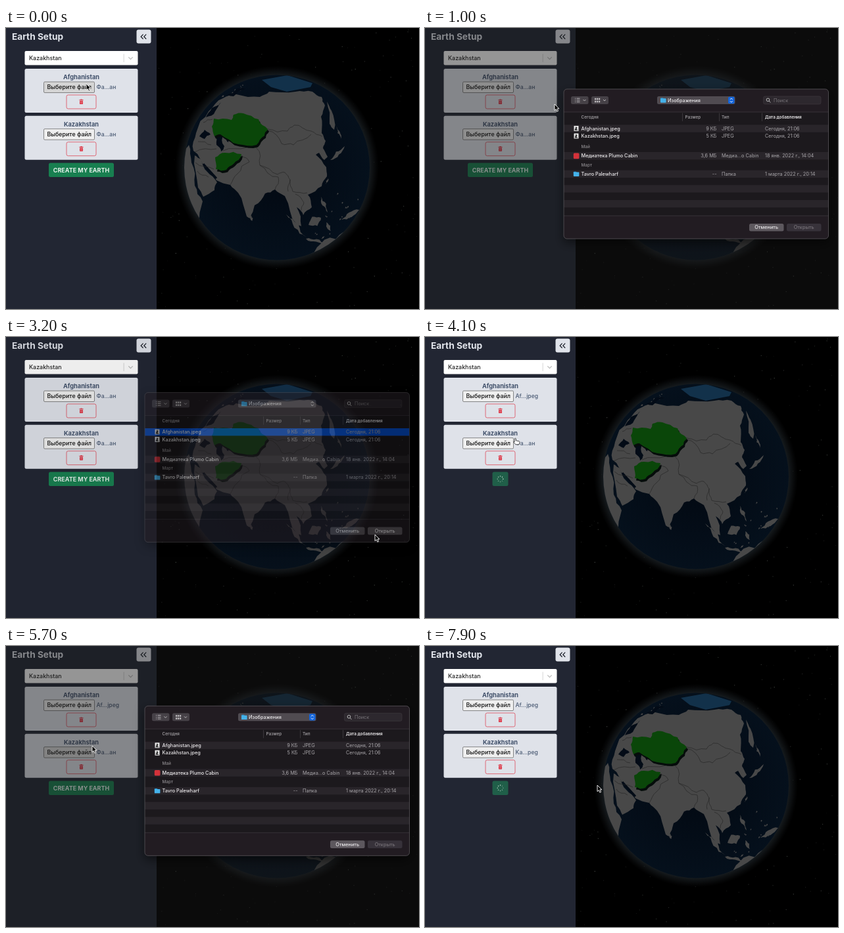
Recreate the animation shown at these times as an HTML page. Size 628x428 px, loop 8000 ms.

```html
<!DOCTYPE html>
<html lang="ru">
<head>
<meta charset="utf-8">
<title>Earth Setup</title>
<style>
html, body { margin: 0; width: 100%; height: 100%; overflow: hidden; background: #000; }
svg { display: block; width: 628px; height: 428px; }
text { font-family: Inter, "Noto Sans", sans-serif; white-space: pre; }
</style>
</head>
<body>
<svg id="stage" viewBox="0 0 628 428" xmlns="http://www.w3.org/2000/svg"></svg>
<script>
const LOOP = 8000, STEP = 100;
const stage = document.getElementById('stage');

const text = (x, y, s, size, fill, weight = 400, anchor = 'start', more = '') =>
  `<text x="${x}" y="${y}" font-size="${size}" fill="${fill}" font-weight="${weight}" text-anchor="${anchor}" ${more}>${s}</text>`;
const rect = (x, y, w, h, fill, r = 0, more = '') =>
  `<rect x="${x}" y="${y}" width="${w}" height="${h}" rx="${r}" fill="${fill}" ${more}/>`;
const dot = (x, y, r, fill, opacity = 1) =>
  `<circle cx="${x.toFixed(1)}" cy="${y.toFixed(1)}" r="${r.toFixed(2)}" fill="${fill}" opacity="${opacity.toFixed(2)}"/>`;
const shape = (d, fill, more = '') => `<path d="M${d}Z" fill="${fill}" ${more}/>`;
const line = (d, stroke, w = 1) => `<path d="${d}" fill="none" stroke="${stroke}" stroke-width="${w}"/>`;
const times = (n, f) => Array.from({ length: n }, (_, i) => f(i)).join('');

let seed = 77;
const rnd = () => (seed = (seed * 16807) % 2147483647) / 2147483647;

// Turns a few key points into a jagged outline by midpoint displacement.
function rough(points, bend = 0.1, closed = true) {
  let p = points.split(' ').map(s => s.split(',').map(Number));
  for (let pass = 0; pass < 2; pass++) {
    p = p.flatMap((a, i) => {
      if (!closed && i === p.length - 1) return [a];
      const b = p[(i + 1) % p.length], k = (rnd() * 2 - 1) * bend;
      return [a, [(a[0] + b[0]) / 2 - (b[1] - a[1]) * k, (a[1] + b[1]) / 2 + (b[0] - a[0]) * k]];
    });
  }
  return p.map(q => q.map(v => v.toFixed(1)).join()).join(' ');
}

// A long island from one end to the other.
function island(x1, y1, x2, y2, w) {
  const len = Math.hypot(x2 - x1, y2 - y1), mx = (x1 + x2) / 2, my = (y1 + y2) / 2;
  const nx = (y2 - y1) / len * w, ny = (x1 - x2) / len * w;
  return rough(`${x1},${y1} ${mx + nx},${my + ny} ${x2},${y2} ${mx - nx},${my - ny}`, 0.18);
}

function globe() {
  const land = '#484848', sea = '#030b16';
  const mainland = '285,187 289,160 308,127 330,107 350,101 386,105 400,97 440,97 466,97 480,105 485,118 479,135 480,160 486,172 482,183 489,196 484,201 476,190 471,193 487,212 488,226 480,241 459,254 465,273 452,285 442,273 449,302 443,300 424,256 409,246 394,252 378,270 372,290 366,287 353,251 341,239 320,232 304,212';
  const coasts = [
    mainland,
    '272,185 278,178 282,205 287,240 299,264 290,298 278,278 268,225',
    '287,194 297,201 306,219 321,235 317,247 300,257 292,243',
    '488,112 495,126 499,155 492,146'
  ].map(p => rough(p));
  const isles = [
    [426, 284, 457, 319, 4], [460, 300, 479, 289, 8], [456, 321, 488, 326, 2], [479, 257, 489, 281, 3],
    [493, 201, 515, 180, 3], [502, 150, 510, 169, 2], [487, 296, 494, 309, 3], [510, 292, 537, 277, 4],
    [461, 345, 514, 310, 6], [373, 286, 374, 294, 2], [486, 238, 490, 229, 1.5]
  ].map(a => island(...a));
  const waters = [
    '317,162 328,161 332,180 327,188 320,178', '294,165 302,155 311,162 302,169',
    '304,136 313,122 327,113 318,127', '334,168 340,168 338,174', '336,102 352,92 364,93 346,104'
  ].map(p => rough(p, 0.15));
  const borders = [
    '398,154 428,157 438,148 464,157 481,165', '398,156 419,176 437,178 464,162',
    '380,182 386,209 413,223 424,220 432,231 429,249', '358,194 370,204 352,222 341,239',
    '386,209 398,221 414,227 409,246', '432,231 436,249 458,251', '440,253 453,266 449,278',
    '292,173 312,178', '287,189 320,184', '291,218 308,227', '288,205 316,215', '300,144 314,139', '330,187 366,182'
  ].map(p => rough(p, 0.15, false));
  const specks = times(34, i => {
    const a = i < 16 ? -2.4 + rnd() * 1.1 : 0.35 + rnd() * 0.7, r = i < 16 ? 126 + rnd() * 13 : 98 + rnd() * 38;
    const x = 412 + r * Math.cos(a), y = 212 + r * Math.sin(a), s = 1 + rnd() * 4;
    return shape(island(x, y, x - s * Math.sin(a), y + s * Math.cos(a), 1), land);
  });
  const raised = p => {
    const d = rough(p, 0.12);
    return shape(d, '#050c0a', 'transform="translate(2 3.5)"') + shape(d, '#0a4609');
  };
  return `
    <defs>
      <clipPath id="ball"><circle cx="412" cy="212.5" r="141"/></clipPath>
      <radialGradient id="sea"><stop offset="0" stop-color="#020811"/><stop offset="1" stop-color="#05101c"/></radialGradient>
      <radialGradient id="halo"><stop offset=".9" stop-color="#20282d" stop-opacity=".75"/><stop offset=".95" stop-color="#161a1d" stop-opacity=".5"/><stop offset="1" stop-color="#101214" stop-opacity="0"/></radialGradient>
    </defs>
    <circle cx="412" cy="212.5" r="155" fill="url(#halo)"/>
    <circle cx="412" cy="212.5" r="141" fill="url(#sea)"/>
    <g clip-path="url(#ball)" stroke-linejoin="round">
      ${specks}
      ${[...coasts, ...isles].map(d => shape(d, land)).join('')}
      ${line('M300,207 320,229', sea, 3)}
      ${waters.map(d => shape(d, sea)).join('')}
      ${borders.map(d => line('M' + d, '#222', 0.6)).join('')}
      ${shape('389,79 428,72 466,84 463,90 427,97 403,90', '#12314a')}
      ${raised('313,150 316,138 343,140 346,132 361,130 384,139 398,154 393,164 381,178 353,177 326,162 317,165')}
      ${raised('318,197 333,190 358,192 346,207 335,216 319,215')}
    </g>`;
}

function card(y, name, id) {
  return rect(28.5, y, 172, 67, '#dfe2e9', 2.5) +
    text(114.5, y + 16, name, 9.2, '#40506a', 700, 'middle') +
    rect(57.5, y + 20, 77, 16.5, '#efefef', 1.5, `id="pick${id}" stroke="#6b6b6b" stroke-width=".8"`) +
    text(96.2, y + 31.3, 'Выберите файл', 8.9, '#111', 500, 'middle') +
    text(137.5, y + 31.3, '', 8.6, '#4b5b74', 500, 'start', `id="file${id}"`) +
    rect(92, y + 40, 45, 21, 'none', 2.5, 'stroke="#dc4a58" stroke-width=".8"') +
    rect(111.4, y + 47.2, 6.2, 1, '#dc3545') + rect(113.2, y + 46.5, 2.6, 1, '#dc3545') +
    rect(112, y + 48.7, 5, 5.4, '#dc3545', 0.7) +
    line(`M113.6,${y + 49.7}v3.4M115.4,${y + 49.7}v3.4`, '#efb9c0', 0.5);
}

function panel() {
  const ring = times(8, i => {
    const a = i * Math.PI / 4;
    return dot(114.5 + 4.2 * Math.cos(a), 216.3 + 4.2 * Math.sin(a), 0.75, '#e3efe8', 0.35 + i * 0.085);
  });
  return rect(0, 0, 229, 428, '#222633') +
    text(9, 17.7, 'Earth Setup', 13.7, '#e1e4eb', 700) +
    rect(198.5, 2.5, 22, 21, '#e0e3ea', 3) +
    line('M208.6,9.6l-3.4,3.6 3.4,3.6M213.2,9.6l-3.4,3.6 3.4,3.6', '#20242e', 1.3) +
    rect(28.5, 35, 172, 21.5, '#fff', 2) +
    text(35, 49, 'Kazakhstan', 8.9, '#222', 500) +
    rect(178.7, 39.5, 0.8, 12.5, '#ccc') +
    line('M186.3,44.4l3.2,3.2 3.2,-3.2', '#bbb', 1.3) +
    card(62, 'Afghanistan', 1) + card(133.7, 'Kazakhstan', 2) +
    `<g id="create">${rect(65, 205.5, 99, 21.5, '#187f50', 2.5)}${text(114.5, 219.5, 'CREATE MY EARTH', 9, '#e5f1eb', 700, 'middle')}</g>` +
    `<g id="wait">${rect(102.5, 205.5, 24, 21.5, '#205f49', 2.5)}<g id="spin">${ring}</g></g>`;
}

function dialog() {
  const soft = '#a9a6aa', dim = '#8d8a8e', white = '#eceaec';
  const label = (x, y, s, fill = soft, weight = 400, anchor = 'start', more = '') => text(x, y, s, 7.3, fill, weight, anchor, more);
  const small = (x, y, s, fill = soft, weight = 500) => text(x, y, s, 6.4, fill, weight);
  const chevron = x => line(`M${x - 2},109l2,2 2,-2`, '#bdbabd');
  const folder = (x, y) => rect(x, y - 3.6, 4.5, 3, '#2a94cf', 0.8) + rect(x, y - 2.7, 8.6, 6.4, '#45b2ea', 0.9);
  const thumb = y => rect(226.5, y - 4, 7, 8, '#e6e6e6', 0.5) + shape(`227.5,${y + 3} 229.5,${y - 3} 231.5,${y - 1} 230.5,${y + 1} 232.5,${y + 3}`, '#333');
  const row = (y, icon, name, size, kind, date) => icon +
    label(237.5, y + 2.6, name, white, 500) + label(443.5, y + 2.6, size, soft, 400, 'end') +
    label(451, y + 2.6, kind) + label(517, y + 2.6, date);
  const listIcon = times(3, i => rect(228, 106.8 + i * 2.7, 1, 0.9, '#c5c2c5') + rect(230.5, 106.8 + i * 2.7, 5, 0.9, '#c5c2c5'));
  const gridIcon = times(6, i => rect(258 + i % 3 * 3, i < 3 ? 106.8 : 110.8, 2.2, 2.6, '#bdbabd'));
  return rect(211, 93, 402.5, 228, '#231e23', 5, 'filter="url(#shade)"') +
    rect(211, 128, 402.5, 158, '#1c191d') +
    [147.4, 189, 216.6, 239.2, 262].map(y => rect(211, y, 402.5, 11.4, '#29252a')).join('') +
    line('M211,128H613.5M211,286H613.5', '#3d383e', 0.8) +
    line('M391.5,129.5v12.5M447.5,129.5v12.5M512.5,129.5v12.5', '#48444a', 0.7) +
    rect(222, 104, 26.5, 12, '#464147', 2.5) + listIcon + chevron(242.5) +
    rect(253, 104, 26, 12, '#464147', 2.5) + gridIcon + chevron(273) +
    rect(353, 104, 118.5, 12, '#504b51', 2.5) + folder(358, 110) + label(369, 112.6, 'Изображения', white, 500) +
    rect(461, 104.8, 9.5, 10.4, '#1264dc', 2, 'id="knob"') +
    line('M463.8,109l2,-2 2,2M463.8,111.2l2,2 2,-2', '#fff', 0.9) +
    rect(514.5, 104, 87.5, 12, '#2d282e', 2.5, 'stroke="#403b41" stroke-width=".6"') +
    line('M523.2,111.2l2.2,2.3M519.2,109.4a2.3,2.3 0 1 0 4.6,0a2.3,2.3 0 1 0 -4.6,0', '#ccc', 0.9) +
    label(530, 112.6, 'Поиск', '#777378') +
    small(237.5, 138, 'Сегодня') + small(395.5, 138, 'Размер') + small(451, 138, 'Тип') +
    small(517, 138, 'Дата добавления', white, 600) +
    rect(211, 147.4, 402.5, 11.4, '#064fd0', 0, 'id="mark"') +
    row(153, thumb(153), 'Afghanistan.jpeg', '9 КБ', 'JPEG', 'Сегодня, 21:06') +
    row(164.4, thumb(164.4), 'Kazakhstan.jpeg', '5 КБ', 'JPEG', 'Сегодня, 21:06') +
    small(237.5, 183, 'Май', dim) +
    row(194.8, rect(225.8, 190.6, 8.6, 8.6, '#d4323a', 1.5), 'Медиатека Plumo Cabin', '3,6 МБ', 'Медиа…o Cabin', '18 янв. 2022 г., 14:04') +
    small(237.5, 210.8, 'Март', dim) +
    row(222.3, folder(225.8, 222.3), 'Tavro Palewharf', '--', 'Папка', '1 марта 2022 г., 20:14') +
    rect(493, 298, 52.5, 11.6, '#5d585e', 2.5) + label(519.2, 306.4, 'Отменить', white, 500, 'middle') +
    rect(550, 298, 52.5, 11.6, '#37323a', 2.5, 'id="open"') + label(576.2, 306.4, 'Открыть', '#777', 500, 'middle', 'id="openText"') +
    rect(211, 93, 402.5, 228, 'none', 5, 'stroke="#5a565b" stroke-width=".8"');
}

stage.innerHTML = `
  <defs><filter id="shade" x="-20%" y="-20%" width="140%" height="150%"><feDropShadow dx="0" dy="6" stdDeviation="8" flood-color="#000" flood-opacity=".55"/></filter></defs>
  ${rect(0, 0, 628, 428, '#000')}
  ${times(240, () => dot(230 + rnd() * 398, rnd() * 428, 0.35 + rnd() * 0.4, '#9aa59a', 0.1 + rnd() * 0.35))}
  ${globe()}${panel()}
  ${rect(0, 0, 628, 428, '#191919', 0, 'id="veil"')}
  <g id="sheet">${dialog()}</g>
  <g id="cursor" stroke-linejoin="round">
    <path id="arrow" d="M0,0V9.6L2.3,7.6 3.9,11.2 5.6,10.4 4,6.9H7Z" fill="#000" stroke="#fff" stroke-width=".9"/>
    <path id="hand" d="M0,1Q1,-.3 2,1V4L7,5Q8,5.4 7.6,7.5L6.6,10H1.6L-1.8,6Q-1.6,4.8 0,5.8Z" fill="#fff" stroke="#222" stroke-width=".8"/>
  </g>`;

const el = id => document.getElementById(id);
const set = (id, attrs) => { for (const k in attrs) el(id).setAttribute(k, attrs[k]); };
const show = (id, on) => set(id, { visibility: on ? 'visible' : 'hidden' });
const within = (t, a, b) => t >= a && t < b;
const progress = (t, start, span) => Math.min(1, Math.max(0, (t - start) / span));
const smooth = k => k * k * (3 - 2 * k);
const settle = k => 1 - (1 - k) ** 4;

// Cursor moves: start, end, destination.
const moves = [
  [300, 1100, 197, 116], [1100, 1500, 242, 149], [1900, 2800, 561, 301], [3500, 4400, 131, 152],
  [5700, 6300, 243, 160], [6500, 7400, 562, 296], [7400, 7900, 262, 212]
];
function cursorAt(t) {
  let x = 122, y = 85;
  for (const [from, to, tx, ty] of moves) {
    const k = settle(progress(t, from, to - from));
    x += (tx - x) * k;
    y += (ty - y) * k;
  }
  return [x, y];
}

function sheetAt(t, start, end) {
  if (t < end) {
    const alpha = smooth(progress(t, start - 100, 500));
    return [alpha, -15 * (1 - progress(t, start - 100, 750)) ** 2, alpha];
  }
  const k = progress(t, end, 500);
  return [1 - k ** 1.6, -14 * k, (1 - k) ** 2];
}

function draw(t) {
  const late = t >= 4500, end = late ? 7400 : 2900;
  const [alpha, dy, veil] = sheetAt(t, late ? 5300 : 300, end);
  set('sheet', { opacity: alpha, transform: `translate(0 ${dy})` });
  set('veil', { opacity: veil * 0.46 });

  const picked = within(t, 1700, 3400) || t >= 6300;
  const active = t < end;
  show('mark', picked);
  set('mark', { y: late ? 158.8 : 147.4 });
  set('knob', { fill: active ? '#1264dc' : '#504b51' });
  set('open', { fill: !picked ? '#37323a' : active ? '#1264dc' : '#5d585e' });
  set('openText', { fill: picked ? '#f0eef0' : '#777278' });

  set('pick1', { fill: t < 700 ? '#d5d5d5' : '#efefef' });
  set('pick2', { fill: within(t, 4300, 5800) ? '#dcdcdc' : '#efefef' });
  el('file1').textContent = t >= 3400 ? 'Af…jpeg' : 'Фа…ан';
  el('file2').textContent = t >= 7800 ? 'Ka…peg' : 'Фа…ан';

  const busy = within(t, 3400, 4500) || t >= 7800;
  show('create', !busy);
  show('wait', busy);
  set('spin', { transform: `rotate(${t * 0.45 % 360} 114.5 216.3)` });

  const [x, y] = cursorAt(t), hand = within(t, 4000, 4300);
  set('cursor', { transform: `translate(${x} ${y})` });
  show('arrow', !hand);
  show('hand', hand);
}

const began = performance.now();
function tick() {
  const t = (performance.now() - began) % LOOP;
  draw(Math.floor(t / STEP) * STEP);
  requestAnimationFrame(tick);
}
tick();
</script>
</body>
</html>
```
